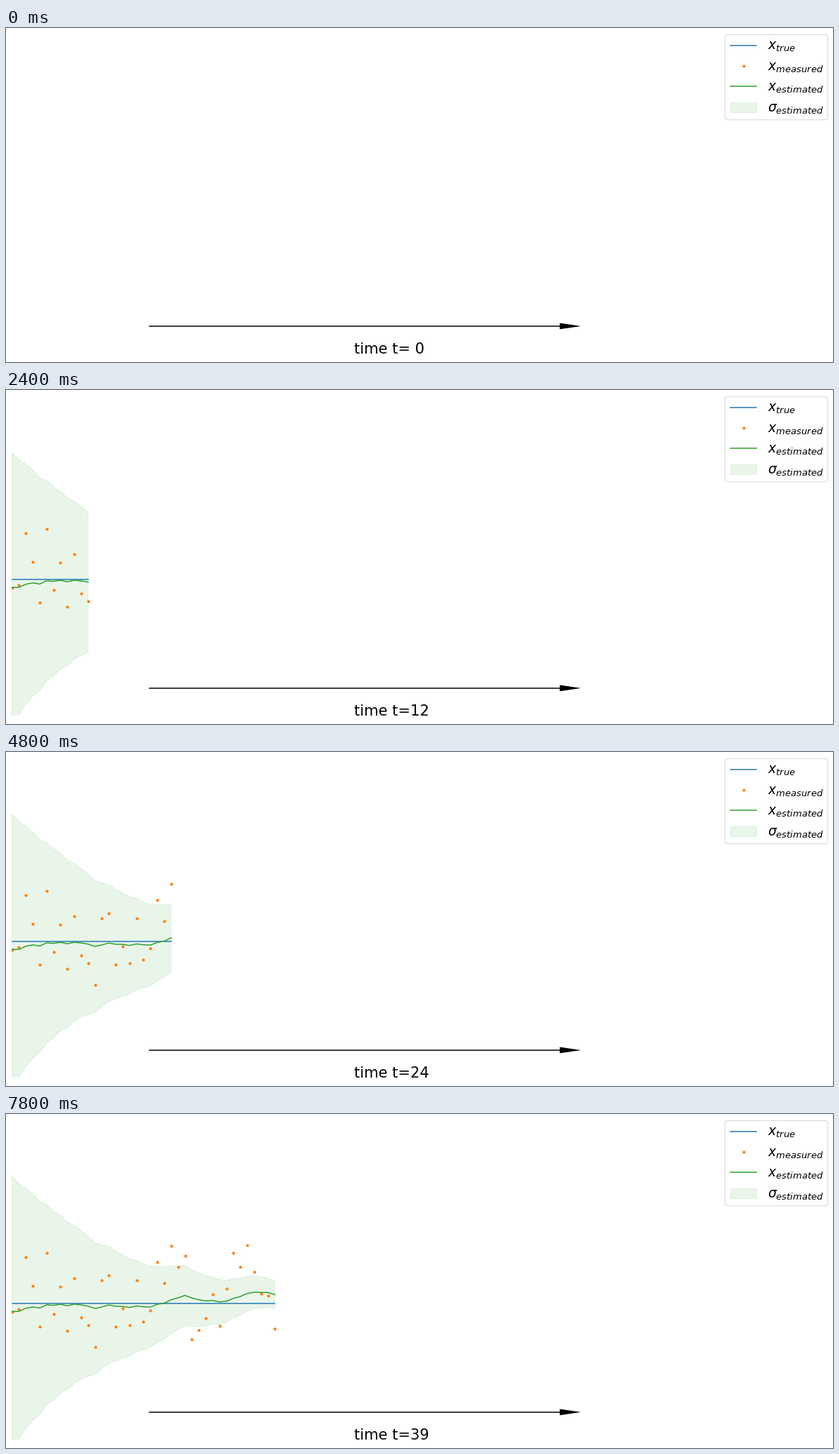
These frames come from a looping animation (1176x476 px, 8000 ms). A matplotlib script:

```python
import numpy as np
import matplotlib.pyplot as plt
from matplotlib.animation import FuncAnimation
from matplotlib.patches import FancyBboxPatch, Polygon, Rectangle

WIDTH, HEIGHT, DPI = 1176, 476, 64
STEPS, INTERVAL = 40, 200
PT = 72 / DPI  # points per pixel
BLUE, ORANGE, GREEN = "tab:blue", "tab:orange", "tab:green"

# All coordinates are pixels, with y pointing down.
X0, DX, TRUE_Y = 8.5, 9.84, 269.8
GAIN, START_Y, START_SIGMA = 0.0584, 281.5, 193.4

measured = np.array([
    282, 278, 204, 245, 303, 198, 284.5, 246, 309, 234,
    289.5, 301, 331.5, 237, 229.5, 303, 277, 301, 237, 296,
    280, 210.5, 241, 188, 218, 201.5, 320.5, 308, 290.5, 257,
    302, 249, 198, 217.5, 187, 225, 256, 259, 306,
])
count = len(measured)
xs = X0 + DX * np.arange(count)
sigma = START_SIGMA * (1 - GAIN) ** np.arange(count)
estimated = np.empty(count)
estimated[0] = START_Y
for i in range(1, count):
    estimated[i] = estimated[i - 1] + GAIN * (measured[i] - estimated[i - 1])

plt.rcParams["font.family"] = "DejaVu Sans"
plt.rcParams["mathtext.fontset"] = "dejavusans"
fig = plt.figure(figsize=(WIDTH / DPI, HEIGHT / DPI), dpi=DPI, facecolor="white")
ax = fig.add_axes([0, 0, 1, 1])
ax.set_xlim(0, WIDTH)
ax.set_ylim(HEIGHT, 0)
ax.axis("off")

LINE = dict(lw=1.5 * PT)
DOT = dict(ls="none", marker=".", ms=6.4 * PT, mew=1.0 * PT, snap=False)
BAND = dict(fc=GREEN, ec=GREEN, alpha=0.1, lw=1.0 * PT)


def draw_legend():
    ax.add_patch(FancyBboxPatch(
        (1022.4, 9.4), 146.2, 121.4, boxstyle="round,pad=0,rounding_size=3.8",
        fc="white", ec="0.8", alpha=0.8, lw=1.0 * PT))
    left, right = 1030, 1067.3
    ax.plot([left, right], [24.9, 24.9], color=BLUE, **LINE)
    ax.plot([(left + right) / 2], [54], color=ORANGE, **DOT)
    ax.plot([left, right], [83.1, 83.1], color=GREEN, **LINE)
    ax.add_patch(Rectangle((left, 106.1), right - left, 13.4, **BAND))
    labels = ["x_{true}", "x_{measured}", "x_{estimated}", r"\sigma_{estimated}"]
    for row, label in enumerate(labels):
        ax.text(1083.1, 31.2 + 29.43 * row, f"${label}$",
                fontsize=18.7 * PT, va="baseline")


def draw_time_arrow():
    ax.plot([204, 790], [425, 425], color="black", lw=1.5 * PT)
    ax.add_patch(Polygon([(787.5, 420.5), (817.5, 424.9), (787.5, 429.3)],
                         fc="black", ec="none"))


draw_legend()
draw_time_arrow()
time_text = ax.text(495.2, 463.8, "", fontsize=21 * PT, va="baseline")

band = ax.add_patch(Polygon([(X0, TRUE_Y)] * 3, zorder=1, **BAND))
true_line, = ax.plot([], [], color=BLUE, **LINE)
dots, = ax.plot([], [], color=ORANGE, **DOT)
estimate_line, = ax.plot([], [], color=GREEN, **LINE)

plot_area = Rectangle((8, 8), 1160, 456, transform=ax.transData)
for artist in (band, true_line, dots, estimate_line):
    artist.set_clip_path(plot_area)


def update(t):
    x, mid, spread = xs[:t], estimated[:t], sigma[:t]
    true_line.set_data(x, np.full(t, TRUE_Y))
    dots.set_data(x, measured[:t])
    estimate_line.set_data(x, mid)
    band.set_visible(t > 0)
    if t:
        upper = np.column_stack([x, mid - spread])
        lower = np.column_stack([x, mid + spread])
        band.set_xy(np.vstack([upper, lower[::-1]]))
    time_text.set_text(f"time t={t:2d}")
    return band, true_line, dots, estimate_line, time_text


anim = FuncAnimation(fig, update, frames=STEPS, interval=INTERVAL,
                     repeat=True, repeat_delay=0)
plt.show()
```
